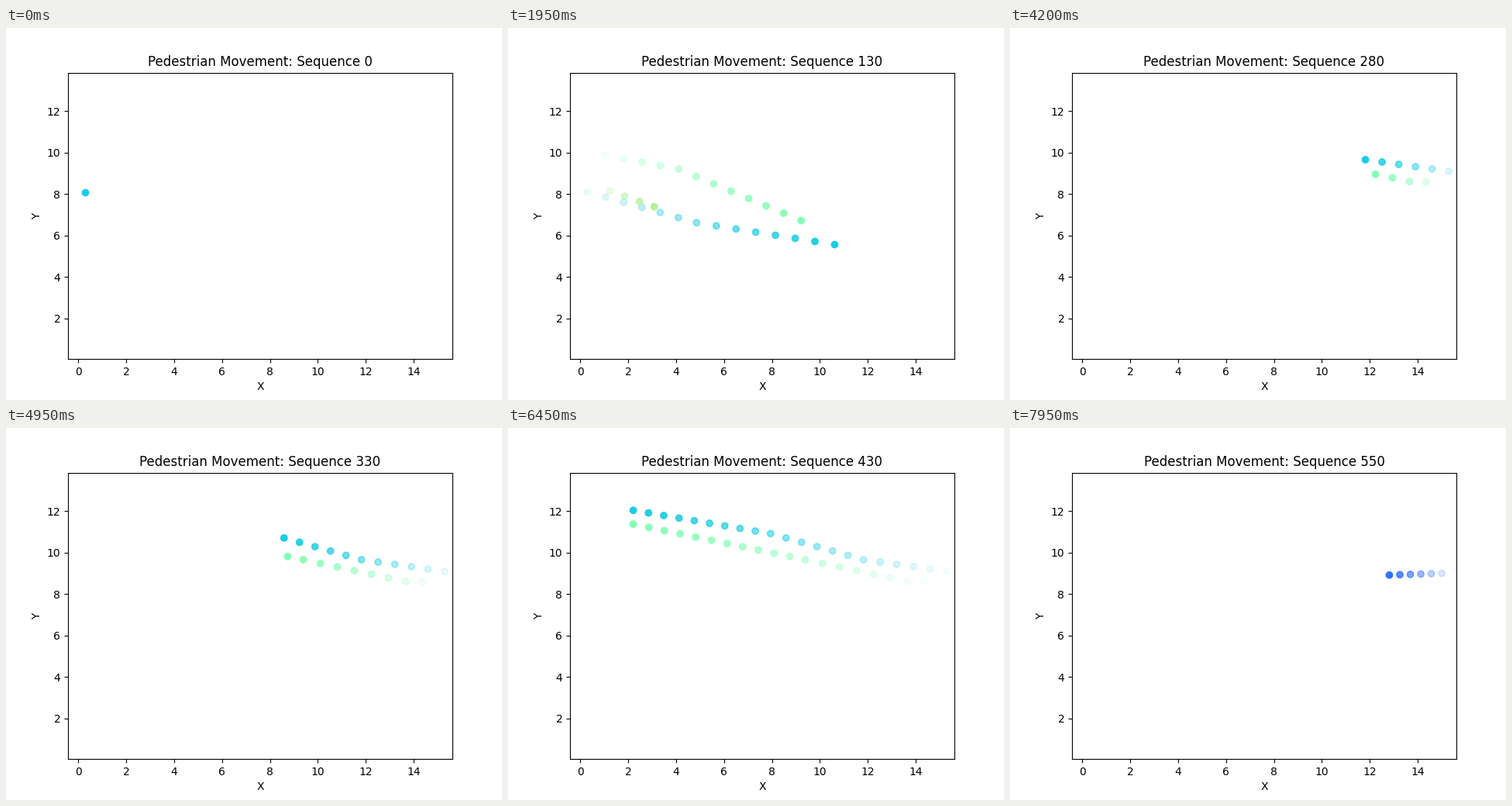
Recreate the animation shown at these times as a matplotlib script. Size 640x480 px, loop 8000 ms.

```python
import numpy as np
import matplotlib.pyplot as plt
from matplotlib.animation import FuncAnimation

plt.rcParams["font.family"] = "DejaVu Sans"

STEP_MS, TICK_MS, LOOP_MS = 150, 50, 8000
GAP_STEP, GAP = 48, 20  # the sequence number jumps while nobody is in view
BLUE, CYAN, GREEN, LIME = plt.cm.rainbow([0.15, 0.3, 0.5, 0.6])


class Walker:
    """Walks at a steady pace between a few turning points (step, x, y)."""

    def __init__(self, color, *turns):
        self.color = color
        self.times, self.xs, self.ys = np.array(turns).T

    def trail(self, step):
        """Positions so far and their colours, fading towards the oldest."""
        start, end = self.times[[0, -1]]
        steps = np.arange(start, step + 1) if step <= end else np.array([])
        count = len(steps)
        colors = np.tile(self.color, (count, 1))
        colors[:, 3] = np.arange(1, count + 1) / max(count, 1)
        points = [np.interp(steps, self.times, axis) for axis in (self.xs, self.ys)]
        return np.column_stack(points), colors


WALKERS = [
    Walker(CYAN, (0, 0.285, 8.1), (6, 4.85, 6.62), (19, 15.56, 4.66)),
    Walker(GREEN, (2, 1.05, 9.87), (6, 4.1, 9.21), (14, 9.95, 6.37),
           (17, 12.34, 5.86), (21, 15.45, 5.93)),
    Walker(LIME, (10, 1.23, 8.15), (23, 9.25, 4.86)),
    Walker(CYAN, (23, 15.3, 9.1), (28, 11.82, 9.66), (34, 7.94, 10.92), (47, -0.345, 12.54)),
    Walker(GREEN, (25, 14.35, 8.59), (26, 13.66, 8.61), (32, 9.39, 9.66), (47, -0.417, 12)),
    Walker(BLUE, (48, 15.01, 9), (53, 12.82, 8.92)),
]

fig, ax = plt.subplots(figsize=(6.4, 4.8), dpi=100)
ax.set(xlim=(-0.437, 15.62), ylim=(0.043, 13.86), xlabel="X", ylabel="Y",
       xticks=range(0, 15, 2), yticks=range(2, 13, 2))
title = ax.set_title("")
dots = ax.scatter([], [])


def update(frame):
    step = frame * TICK_MS // STEP_MS
    points, colors = map(np.vstack, zip(*(walker.trail(step) for walker in WALKERS)))
    dots.set_offsets(points)
    dots.set_facecolor(colors)
    dots.set_edgecolor(colors)
    sequence = 10 * step + (GAP if step >= GAP_STEP else 0)
    title.set_text(f"Pedestrian Movement: Sequence {sequence}")
    return dots, title


anim = FuncAnimation(fig, update, frames=LOOP_MS // TICK_MS, interval=TICK_MS,
                     repeat=True, repeat_delay=0)
plt.show()
```
